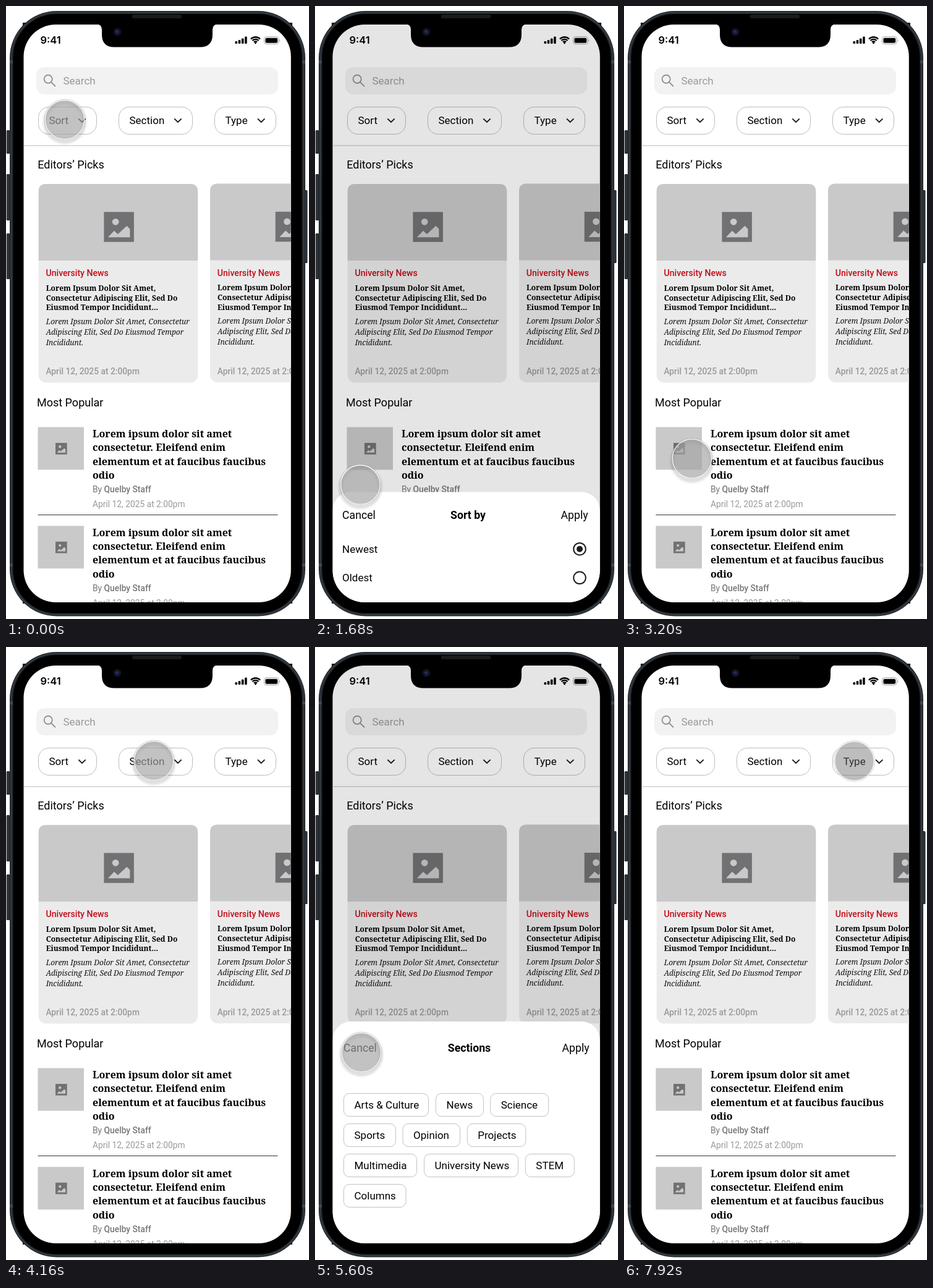
An HTML page that plays this animation: 490x992 px, repeating every 8 s.

```html
<!DOCTYPE html>
<html lang="en">
<head>
<meta charset="utf-8">
<title>News search filters</title>
<style>
html, body { margin: 0; width: 100%; height: 100%; overflow: hidden; background: #fff; }
svg { display: block; width: 100vw; height: 100vh; }
text { font-family: Roboto, sans-serif; font-size: 17px; fill: #000; white-space: pre; }
.head { font-size: 18px; }
.bar { font-size: 17.7px; }
.title { font-weight: 700; font-size: 17.7px; text-anchor: middle; }
.tag { font-weight: 500; font-size: 14.1px; fill: #c20d17; }
.serif { font-family: "Noto Serif", serif; font-weight: 700; }
.lead { font-size: 12px; }
.story { font-size: 16px; }
.blurb { font-family: "Noto Serif", serif; font-style: italic; font-size: 12px; fill: #111; }
.meta { font-size: 13.8px; fill: #999; }
.strong { font-weight: 500; }
.by { font-size: 13.8px; fill: #777; }
.clock { font-family: Inter, sans-serif; font-weight: 600; font-size: 16.5px; }
</style>
</head>
<body>
<svg id="stage" viewBox="0 0 490 992" preserveAspectRatio="none"></svg>
<script>
const text = (x, y, s, cls = "") => `<text x="${x}" y="${y}" class="${cls}">${s}</text>`;
const rect = (x, y, w, h, r, fill, more = "") =>
  `<rect x="${x}" y="${y}" width="${w}" height="${h}" rx="${r}" fill="${fill}" ${more}/>`;
const path = (d, more) => `<path d="${d}" ${more}/>`;
const circle = (x, y, r, more) => `<circle cx="${x}" cy="${y}" r="${r}" ${more}/>`;
const lines = (x, y, step, list, cls) => list.map((s, i) => text(x, y + i * step, s, cls)).join("");
const group = (x, y, body, k = 1) => `<g transform="translate(${x} ${y}) scale(${k})">${body}</g>`;

const picture = rect(0, 0, 48.5, 48.5, 0, "#717174") +
  circle(18.8, 16, 5.4, 'fill="#c9c9c9"') +
  path("M6.5 41L16.5 30.5 22.5 36 37 22.5 42 27.5V41Z", 'fill="#c9c9c9"');

const pill = (x, w, label, arrow) =>
  rect(x, 163.5, w, 44, 17, "none", 'stroke="#bcbcbc"') + text(x + 17, 191, label) +
  path(`M${arrow - 5.7} 182.3l5.7 5.7 5.7-5.7`, 'fill="none" stroke="#1c1c1c" stroke-width="1.9"');

const card = (x, y) => group(x, y,
  rect(0, 0, 257.5, 321.5, 12, "#ebebeb") +
  path("M0 124V12Q0 0 12 0H245.5Q257.5 0 257.5 12V124Z", 'fill="#c9c9c9"') +
  group(105.7, 45.3, picture) +
  text(11.8, 149, "University News", "tag") +
  lines(12, 172.7, 15.8, ["Lorem Ipsum Dolor Sit Amet,", "Consectetur Adipiscing Elit, Sed Do",
    "Eiusmod Tempor Incididunt..."], "serif lead") +
  lines(12, 226.5, 17, ["Lorem Ipsum Dolor Sit Amet, Consectetur",
    "Adipiscing Elit, Sed Do Eiusmod Tempor", "Incididunt."], "blurb") +
  text(11.8, 308.3, "April 12, 2025 at 2:00pm", "meta strong"));

const story = y => group(0, y,
  rect(51.5, 0, 74.5, 69, 0, "#c9c9c9") + group(80, 25.5, picture, 0.385) +
  lines(140, 16.7, 22.2, ["Lorem ipsum dolor sit amet", "consectetur. Eleifend enim",
    "elementum et at faucibus faucibus", "odio"], "serif story") +
  text(140, 105.5, 'By <tspan class="strong">Quelby Staff</tspan>', "by") +
  text(140, 129.8, "April 12, 2025 at 2:00pm", "meta"));

const wifi = [3.5, 7, 10.5].map(r => {
  const d = r * 0.72;
  return path(`M${403.5 - d} ${61 - d}A${r} ${r} 0 0 1 ${403.5 + d} ${61 - d}`,
    'fill="none" stroke="#000" stroke-width="2.3"');
}).join("") + circle(403.5, 60, 1.4, "");

const status = text(55.5, 61, "9:41", "clock") +
  [4, 6, 8.5, 11.5].map((h, i) => rect(370.5 + i * 5.2, 61 - h, 3.6, h, 1, "#000")).join("") + wifi +
  rect(417.5, 49.8, 23.6, 11.8, 3.6, "none", 'stroke="#a2a2a2"') +
  rect(419.4, 51.7, 19.8, 8, 2, "#000") + path("M442.4 53.8q2 2 0 4Z", 'fill="#a2a2a2"');

const home = rect(28, 30, 433, 935, 0, "#fff") + status +
  rect(49, 99, 391, 44, 13, "#f2f2f2") +
  circle(68.2, 118.3, 6.6, 'fill="none" stroke="#8a8a8a" stroke-width="1.7"') +
  path("M73 123.2L80 130.2", 'stroke="#8a8a8a" stroke-width="1.8"') +
  `<text x="92.5" y="127" style="fill:#9a9a9a">Search</text>` +
  pill(52.5, 94, "Sort", 123) + pill(182.5, 119, "Section", 278) + pill(337.5, 99, "Type", 412.7) +
  rect(28, 225.3, 433, 1.2, 0, "#c6c6c6") +
  text(51.2, 263, "Editors’ Picks", "head") +
  card(52.7, 288) + card(330, 287.6) +
  text(50, 647.8, "Most Popular", "head") +
  story(681.5) + rect(51.5, 823, 388, 1, 0, "#333") + story(841.3);

const sheet = (id, top, y, x, name, body) => `<g id="${id}">` +
  rect(28.5, top, 432.3, 1000 - top, 30, "#fff") +
  text(x, y, "Cancel", "bar") + text(x + 203.5, y, name, "title") +
  text(x + 353.5, y, "Apply", "bar") + body + "</g>";

const radio = (y, on) => circle(428, y, 9.8, 'fill="none" stroke="#1c1c1c" stroke-width="2"') +
  (on ? circle(428, y, 5, 'fill="#1c1c1c"') : "");

const sortBody = text(44, 884.5, "Newest") + text(44, 931.3, "Oldest") + radio(878.7, true) + radio(925.3, false);

const chips = [
  [["Arts &amp; Culture", 46.5, 137], ["News", 195.5, 77], ["Science", 283.7, 94]],
  [["Sports", 46.5, 84], ["Opinion", 142, 92.5], ["Projects", 246.3, 94.5]],
  [["Multimedia", 46.5, 118], ["University News", 176.5, 152], ["STEM", 340.3, 79]],
  [["Columns", 46.5, 100.5]]
].map((row, i) => row.map(([s, x, w]) =>
  rect(x, 722.5 + i * 49, w, 37, 9, "none", 'stroke="#c2c2c2"') +
  text(x + 17, 747 + i * 49, s)).join("")).join("");

const key = (x, y, h) => rect(x, y, 5.5, h, 1.5, "#262b30") + rect(x + 1.5, y + 2, 1, h - 4, 0, "#434a51");
const phone = key(0.8, 201, 38) + key(0.8, 272, 75) + key(0.8, 368, 74) + key(482, 298, 118) +
  rect(27, 27, 436, 940, 0, "#000") +
  rect(6, 8, 478, 979.5, 76, "#23282d") +
  rect(8.5, 10.5, 473, 974.5, 73.5, "none", 'stroke="#3a4147" stroke-width="1.4"') +
  [88, 902].map(y => rect(6, y, 5, 5, 0, "#3f464d") + rect(479, y, 5, 5, 0, "#3f464d")).join("") +
  rect(11.5, 13, 467, 969.5, 70, "#000");

const notch = path("M146 29Q155 30 155 38V46Q155 66.5 175 66.5H314Q334 66.5 334 46V38Q334 30 343 29Z", "") +
  rect(204, 14, 80, 6, 2, "#1a1b1d") +
  circle(180, 42, 6.5, 'fill="#10131f"') + circle(180, 42, 3.2, 'fill="#1b2350"') + circle(179, 41, 1, 'fill="#39458a"');

const cursor = '<g id="cursor">' +
  circle(0, 4, 32, 'id="shade" fill="none" stroke="#000" stroke-width="4" filter="url(#soft)"') +
  circle(0, 0, 32.8, 'fill="none" stroke="#999" stroke-opacity=".5" stroke-width="1"') +
  circle(0, 0, 32, 'id="dot"') +
  circle(0, 0, 31.7, 'fill="none" stroke="#fff" stroke-opacity=".9" stroke-width="1.3"') + "</g>";

document.getElementById("stage").innerHTML = `<defs>
  <clipPath id="screen">${rect(28.5, 30, 432.3, 935, 52, "#fff")}</clipPath>
  <filter id="soft" x="-30%" y="-30%" width="160%" height="160%"><feGaussianBlur stdDeviation="2.2"/></filter>
  </defs>` + phone + '<g clip-path="url(#screen)">' + home + rect(28, 30, 433, 935, 0, "#000", 'id="dim"') +
  sheet("sort", 786.5, 830.3, 44, "Sort by", sortBody) +
  sheet("sections", 606, 655, 46, "Sections", chips) + "</g>" + notch + cursor;

const $ = id => document.getElementById(id);
const [dim, sort, sections, pointer, dot, shade] =
  ["dim", "sort", "sections", "cursor", "dot", "shade"].map($);

const clamp = v => Math.min(1, Math.max(0, v));
const mix = (a, b, p) => a + (b - a) * p;
const inOut = t => t < 0.5 ? 8 * t ** 4 : 1 - 8 * (1 - t) ** 4;
const out = t => 1 - (1 - t) ** 3;
const span = (t, from, to) => clamp((t - from) / (to - from));

const LOOP = 8000;
// start, end, x, y, sideways bow
const moves = [
  [480, 2180, 72, 812, 0],
  [2669, 4169, 239, 184, 38],
  [4640, 5600, 75, 656, 0],
  [6250, 7450, 372.5, 184.5, 0]
];

function place(t) {
  let x = 95, y = 184;
  for (const [from, to, nx, ny, bow] of moves) {
    if (t < from) break;
    const p = inOut(span(t, from, to));
    x = mix(x, nx, p) + 4 * bow * p * (1 - p);
    y = mix(y, ny, p);
  }
  return [x, y];
}

const opened = (t, from, to) => out(span(t, from, from + 320)) * (1 - out(span(t, to, to + 320)));

function draw() {
  const t = performance.now() % LOOP;
  const a = opened(t, 220, 2240), b = opened(t, 4480, 6260);
  dim.setAttribute("opacity", 0.1 * Math.max(a, b));
  sort.setAttribute("transform", `translate(0 ${(1 - a) * 180})`);
  sections.setAttribute("transform", `translate(0 ${(1 - b) * 361})`);
  const [x, y] = place(t);
  pointer.setAttribute("transform", `translate(${x} ${y})`);
  const press = span(t, 7300, 7600), g = Math.round(mix(165, 110, press));
  dot.setAttribute("fill", `rgb(${g},${g},${g})`);
  dot.setAttribute("fill-opacity", mix(0.67, 0.45, press));
  shade.setAttribute("opacity", mix(0.2, 0, span(t, 6240, 6500)));
  requestAnimationFrame(draw);
}
draw();
</script>
</body>
</html>
```
